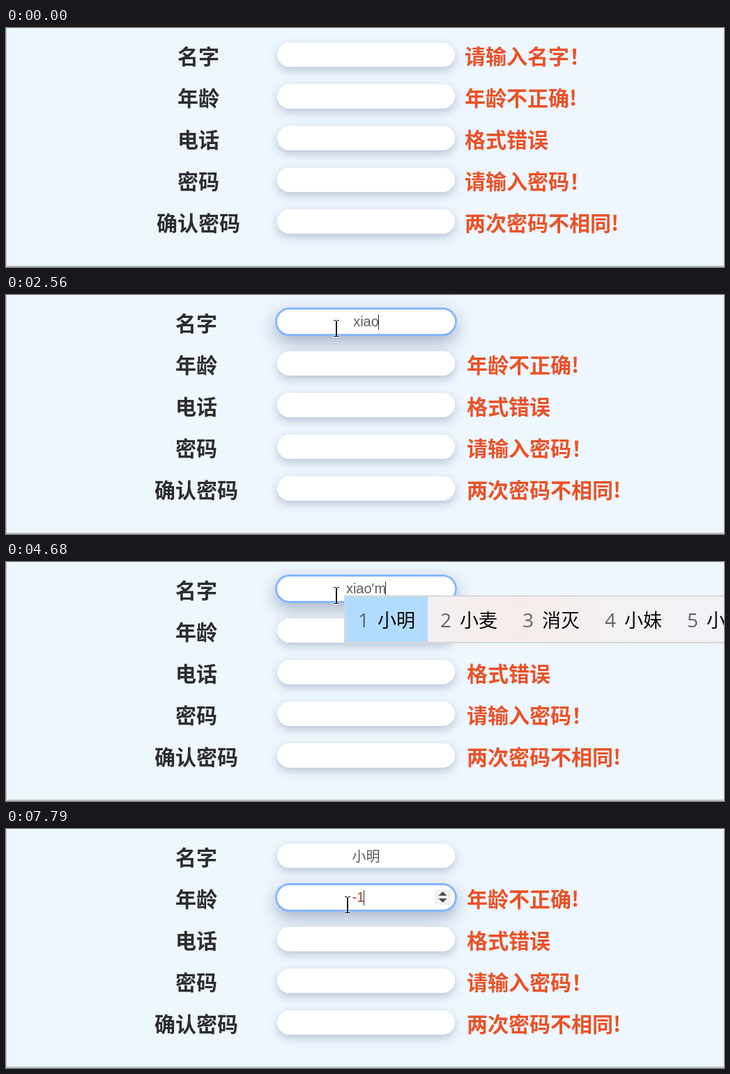
These frames come from a looping animation (1030 by 344 pixels, 8 s). An HTML page with a canvas:

```html
<!DOCTYPE html>
<html lang="zh-CN">
<head>
<meta charset="utf-8">
<style>
html, body { margin: 0; width: 100%; height: 100%; overflow: hidden; background: #eef6fe; }
canvas { display: block; width: 1030px; height: 344px; }
</style>
</head>
<body>
<canvas id="stage"></canvas>
<script>
const W = 1030, H = 344, LOOP = 8000;
const canvas = document.getElementById('stage');
const ctx = canvas.getContext('2d');
const ratio = window.devicePixelRatio || 1;
canvas.width = W * ratio;
canvas.height = H * ratio;

const CJK = '"Noto Sans CJK SC", "Noto Sans CJK", sans-serif';
const LATIN = '"Liberation Sans", Arial, sans-serif';
const DIGIT = '"Open Sans", "Noto Sans", sans-serif';

const rows = [
  ['名字', '请输入名字！'],
  ['年龄', '年龄不正确!'],
  ['电话', '格式错误'],
  ['密码', '请输入密码！'],
  ['确认密码', '两次密码不相同!']
];

// Each track lists [start, ...values]; a value holds until the next start.
const nameText = [
  [0, ''], [1710, 'xi'], [1780, 'xia'], [2010, 'xiao'], [2180, 'xiaom'],
  [2560, 'xiao'], [2970, 'xia'], [3120, 'xi'], [3280, 'x'], [3730, ''],
  [4190, 'x'], [4290, 'xi'], [4360, 'xia'], [4530, 'xiao'], [4680, "xiao'm"],
  [5140, '小明']
];
const ageText = [[0, ''], [7640, '-'], [7790, '-1']];
const nameFocus = [[0, 0], [920, 0.5], [990, 1], [6470, 0.5], [6550, 0]];
const ageFocus = [[0, 0], [6470, 0.5], [6550, 1]];
const nameCaret = [
  [0, 0], [840, 1], [1390, 0], [1710, 1], [2660, 0], [3120, 1], [5670, 0]
];
const ageCaret = [[0, 0], [6470, 1], [7000, 0], [7490, 1]];
const pointer = [
  [0, -99, -99], [230, 575, 139], [310, 545, 112], [380, 518, 85],
  [550, 500, 72], [620, 480, 54], [700, 474, 48],
  [5460, 475, 55], [5540, 480, 72], [5610, 485, 88], [5690, 489, 102],
  [5760, 490, 108], [5840, 490, 112], [6240, 490, 109]
];
const press = [[0, 0], [770, 1], [920, 0], [6310, 1], [6470, 0]];

const candidates = {
  x: ['下', '先', '想', '小', '向', '行'],
  xi: ['系', '洗', '西', '细', '喜', '戏'],
  xia: ['下', '夏', '吓', '瞎', '虾', '霞'],
  xiao: ['小', '笑', '校', '消', '效', '晓'],
  "xiao'm": ['小明', '小麦', '消灭', '小妹', '小猫']
};

const at = (track, t) => track.reduce((a, b) => (b[0] <= t ? b : a)).slice(1);
const between = (t, a, b) => t >= a && t < b;
const mix = (a, b, k) => a + (b - a) * k;

function text(str, x, y, font, color, align = 'left') {
  ctx.font = font;
  ctx.fillStyle = color;
  ctx.textAlign = align;
  ctx.fillText(str, x, y);
}

function rect(x, y, w, h, color) {
  ctx.fillStyle = color;
  ctx.fillRect(x, y, w, h);
}

function pill(x, y, w, h, color) {
  ctx.beginPath();
  ctx.roundRect(x, y, w, h, h / 2);
  ctx.fillStyle = color;
  ctx.fill();
}

function field(y, focus) {
  const b = 3 * focus;
  ctx.save();
  ctx.shadowColor = `rgba(90, 110, 145, ${mix(0.36, 0.5, focus)})`;
  ctx.shadowOffsetY = mix(5, 9, focus) * ratio;
  ctx.shadowBlur = mix(13, 25, focus) * ratio;
  pill(389 - b, y - b, 255 + 2 * b, 35 + 2 * b, focus ? '#86b7fb' : '#fff');
  ctx.restore();
  if (focus) pill(389, y, 255, 35, '#fff');
}

function entry(str, cx, base, color, caret) {
  const han = str > '一';
  const font = '20px ' + (han ? CJK : LATIN);
  text(str, cx, base + (han ? 2 : 0), font, color, 'center');
  if (!caret) return;
  const x = Math.floor(cx + ctx.measureText(str).width / 2 - 0.5);
  rect(x, base - 17, str || base > 60 ? 1 : 2, 22, '#333');
}

function triangle(y, dir) {
  ctx.beginPath();
  ctx.moveTo(620.5, y);
  ctx.lineTo(632.5, y);
  ctx.lineTo(626.5, y + 6 * dir);
  ctx.fill();
}

function spinner() {
  rect(615, 87, 23, 22, '#f0f0f0');
  ctx.fillStyle = '#4d4d4d';
  triangle(96, -1);
  triangle(100, 1);
}

function beam(x, y) {
  const part = (dx, dy, w, h) => [x + dx, y + dy, w, h];
  const parts = [
    part(-1, -11, 2, 23), part(-4, -12, 3, 1), part(1, -12, 3, 1),
    part(-4, 11, 3, 1), part(1, 11, 3, 1)
  ];
  for (const [a, b, w, h] of parts) rect(a - 1, b - 1, w + 2, h + 2, 'rgba(255,255,255,.6)');
  for (const p of parts) rect(...p, '#111');
}

function popup(typed) {
  const list = candidates[typed];
  if (!list) return;
  ctx.font = '20px ' + LATIN;
  const left = Math.round(516.5 - ctx.measureText(typed).width / 2 - 1.7);
  const bg = ctx.createLinearGradient(500, 0, W, 0);
  bg.addColorStop(0, '#f1f3f6');
  bg.addColorStop(0.45, '#f7ecea');
  bg.addColorStop(0.75, '#f2f2f4');
  bg.addColorStop(1, '#f0f2f5');
  rect(left - 1, 48, W, 69, '#d6d8da');
  rect(left + 1, 50, W, 65, bg);
  let x = left + 1;
  list.forEach((word, i) => {
    const w = 64 + 27 * word.length;
    if (!i) rect(x, 50, w, 65, '#b2dcff');
    text(i + 1, x + 18, 94, '28px ' + DIGIT, '#626466');
    text(word, x + 46, 94, '27px ' + CJK, '#080808');
    x += w;
  });
}

function draw(t) {
  const [name] = at(nameText, t), [age] = at(ageText, t);
  const [f0] = at(nameFocus, t), [f1] = at(ageFocus, t);
  const [px, py] = at(pointer, t);
  const shift = 3 * Math.min(1, f0 + f1);
  const focus = [f0, f1, 0, 0, 0];
  const hidden = [
    !(t < 1710 || between(t, 3730, 4190)),
    between(t, 7640, 7790)
  ];

  ctx.setTransform(ratio, 0, 0, ratio, 0, 0);
  rect(0, 0, W, H, '#eef6fe');
  rect(0, 0, 1, H, '#b9bfc4');
  rect(0, 342, W, 2, '#bcc2c7');

  rows.forEach(([label, error], i) => {
    const y = 21 + 60 * i;
    field(y, focus[i]);
    text(label, 276 - shift, y + 31, 'bold 30px ' + CJK, '#2d2d30', 'center');
    if (!hidden[i]) text(error, 658 + shift, y + 31, 'bold 30px ' + CJK, '#ea5228');
  });

  const hover = px > 389 && px < 644 && between(py, 81, 117);
  if (hover || f1) spinner();
  entry(name, 516.5, 45, '#5c5c60', at(nameCaret, t)[0]);
  entry(age, 505.5, 105, '#a04a34', at(ageCaret, t)[0]);
  // The Chinese input method is only switched on for the second attempt.
  if (t >= 4190) popup(name);
  beam(px, py);
  if (at(press, t)[0]) {
    ctx.globalCompositeOperation = 'multiply';
    pill(px - 19, py - 19, 36, 36, '#ffff80');
    ctx.globalCompositeOperation = 'source-over';
  }
}

const start = performance.now();
function tick() {
  draw((performance.now() - start) % LOOP);
  requestAnimationFrame(tick);
}
tick();
</script>
</body>
</html>
```
